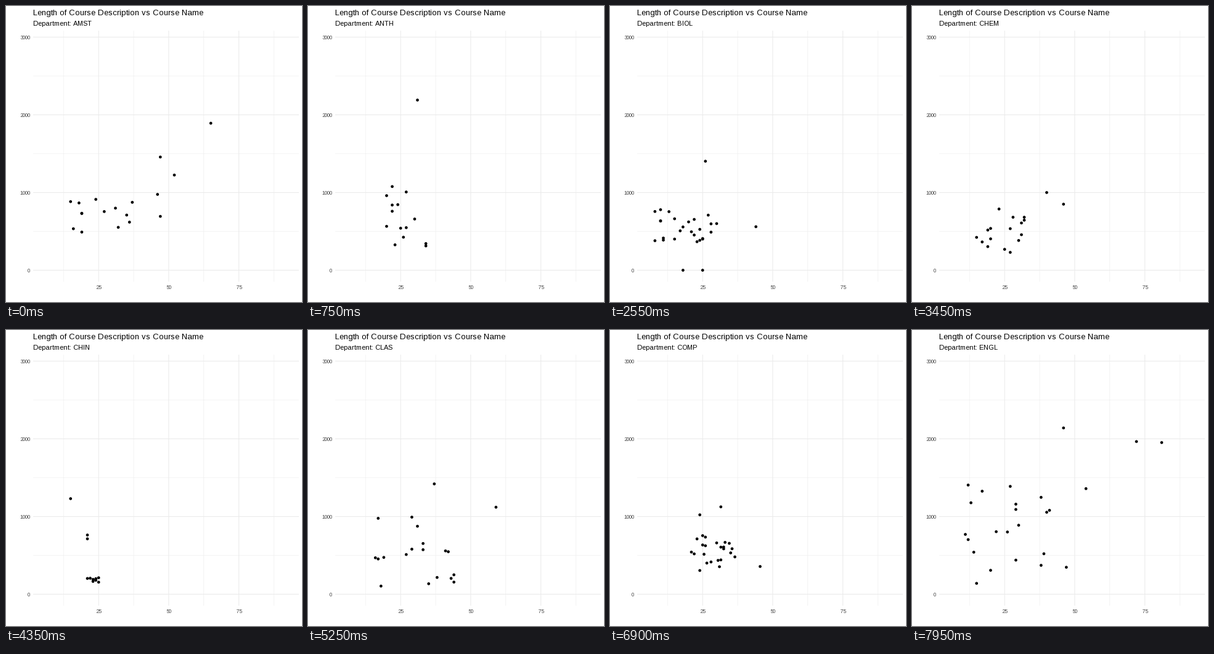
These frames come from a looping animation (480x480 px, 8000 ms). A matplotlib script:

```python
import matplotlib.pyplot as plt
import numpy as np
from matplotlib.animation import FuncAnimation

SIZE, DPI = 480, 100
PX = 72 / DPI                      # one pixel in points
FRAMES, INTERVAL = 160, 50
CYCLE, HOLD, LEAD = 18, 15, 3      # lengths in frames
LEFT, RIGHT, TOP, BOTTOM = 44, 474.5, 39.5, 447

# whole-pixel letter advances
plt.rcParams.update({"font.family": "Liberation Sans",
                     "text.hinting": "force_autohint",
                     "text.hinting_factor": 1})

rng = np.random.default_rng(11)


def courses(n, xs, ys, outliers, skew=1):
    """A few outliers, then a random cloud within the two ranges."""
    m = n - len(outliers)
    x = xs[0] + (xs[1] - xs[0]) * rng.random(m) ** skew
    y = rng.uniform(*ys, m)
    return np.vstack([outliers, np.column_stack([x, y]).round()])


# x: name length, y: description length
DEPARTMENTS = {
    "AMST": courses(18, (14, 49), (418, 987),
                    [(52, 1225), (47, 1457), (65, 1892)]),
    "ANTH": courses(15, (19, 36), (300, 1080), [(31, 2190)]),
    "ART": courses(20, (9, 40), (270, 1090),
                   [(44, 443), (48, 1433), (53, 1070)], skew=3),
    "BIOL": courses(29, (7, 30), (350, 795),
                    [(44, 560), (26, 1403), (18, 0), (25, 0)]),
    "CHEM": courses(18, (14, 36), (213, 800), [(46, 850), (40, 1000)]),
    "CHIN": courses(12, (20, 25), (155, 220),
                    [(25, 155), (15, 1230), (21, 762), (21, 713)]),
    "CLAS": courses(20, (14, 48), (95, 1000),
                    [(59, 1120), (17, 454), (37, 1420)]),
    "COMP": courses(26, (19, 44), (350, 900), [(47, 350), (29, 1500)]),
    "ECON": courses(26, (14, 44), (150, 800),
                    [(44, 364), (19, 544), (32, 0), (26, 1396)]),
    "ENGL": courses(25, (11, 59), (290, 1455),
                    [(72, 1965), (15, 140), (81, 1952), (46, 2140)]),
}
NAMES, POINTS = list(DEPARTMENTS), list(DEPARTMENTS.values())


def halfway(a, b):
    """Paired rows sit midway; leftover rows of a wait in place."""
    n = min(len(a), len(b))
    return np.vstack([(a[:n] + b[:n]) / 2, a[n:]])


fig = plt.figure(figsize=(SIZE / DPI, SIZE / DPI), dpi=DPI, facecolor="white")
ax = fig.add_axes([LEFT / SIZE, 1 - BOTTOM / SIZE,
                   (RIGHT - LEFT) / SIZE, (BOTTOM - TOP) / SIZE])
ax.set(xlim=(1.65, 96.3), ylim=(-147, 3087))
ax.axis("off")


def label(x, y, text, size, color="black", ha="left"):
    return fig.text(x / SIZE, 1 - y / SIZE, text, fontsize=size * PX,
                    color=color, ha=ha, va="baseline")


def grid(draw, values, width):
    for v in values:
        draw(v, color="#ebebeb", lw=width * PX, snap=False, zorder=1)


X_TICKS, Y_TICKS = np.arange(25, 76, 25), np.arange(0, 3001, 1000)
grid(ax.axvline, np.arange(12.5, 88, 25), 0.53)
grid(ax.axhline, Y_TICKS[:-1] + 500, 0.53)
grid(ax.axvline, X_TICKS, 1.07)
grid(ax.axhline, Y_TICKS, 1.07)

for v in X_TICKS:
    label(36.5 + 4.548 * v, 459, str(v), 8.8, "#4d4d4d", "center")
for v in Y_TICKS:
    label(39.1, 431.6 - 0.126 * v, str(v), 8.8, "#4d4d4d", "right")

label(LEFT, 15, "Length of Course Description vs Course Name", 13.2)
subtitle = label(LEFT, 32, "", 11)

# two line widths keep the dots at sub-pixel positions
dots = ax.scatter([], [], s=(4.7 * PX) ** 2, c="black",
                  linewidths=(0, 0), zorder=2)


def update(frame):
    k, phase = divmod(frame + LEAD, CYCLE)
    moving = phase >= HOLD
    dots.set_offsets(halfway(POINTS[k], POINTS[k + 1]) if moving else POINTS[k])
    subtitle.set_text(f"Department: {NAMES[k]}")
    return dots, subtitle


anim = FuncAnimation(fig, update, frames=FRAMES, interval=INTERVAL,
                     repeat=True, repeat_delay=0, blit=False)
plt.show()
```
